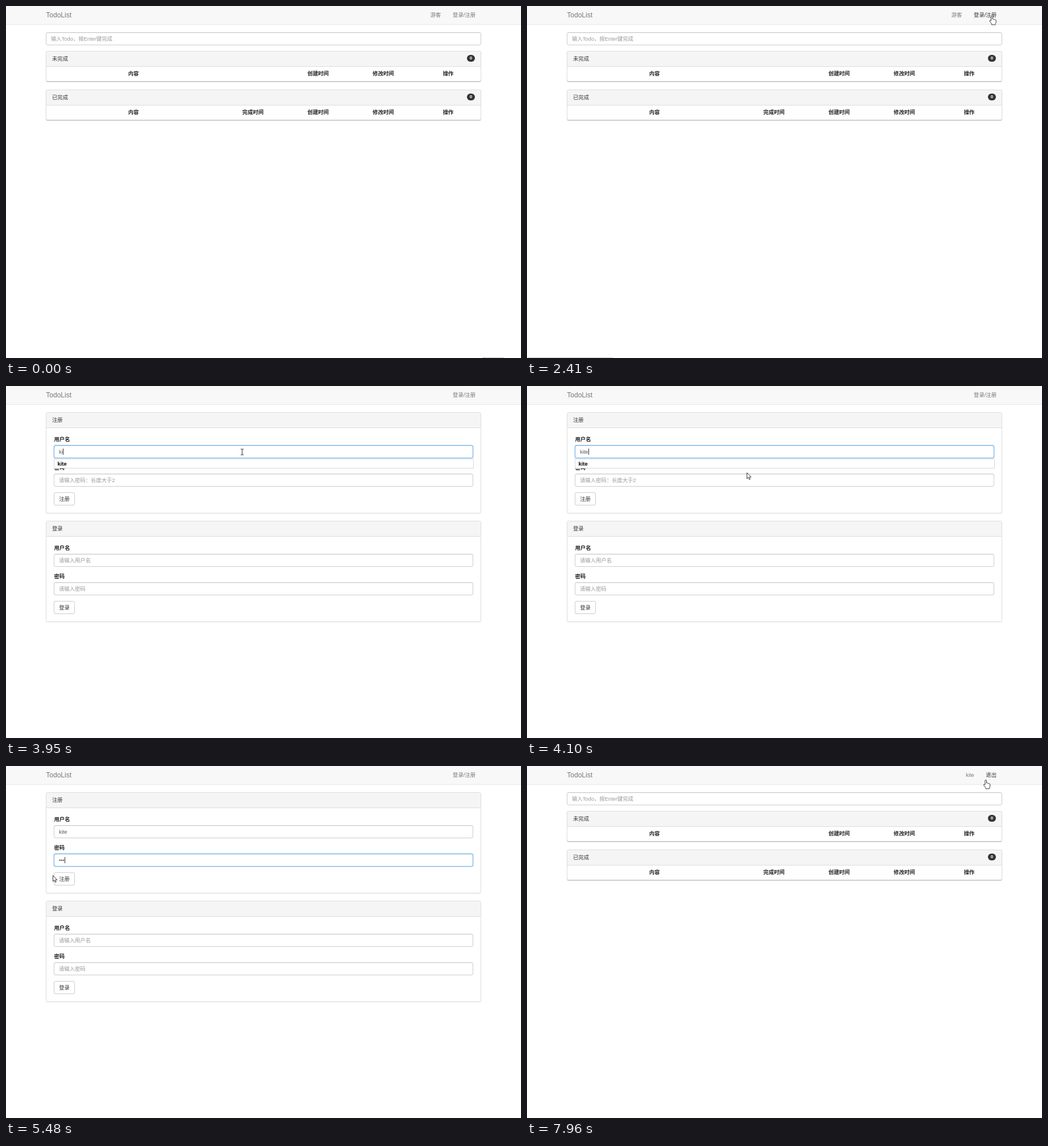
Animation of 905x619 px, one loop 8 s. Source, as an HTML page:

```html
<!DOCTYPE html>
<html lang="zh-CN">
<head>
<meta charset="utf-8">
<title>TodoList</title>
<style>
html, body { margin: 0; width: 100%; height: 100%; overflow: hidden; background: #fff; }
body { position: relative; font: 9.333px/14px "Liberation Sans", Arial, "Noto Sans CJK SC", "Noto Sans CJK", sans-serif; color: #333; }
div, svg { position: absolute; box-sizing: border-box; }
.view { inset: 0; }
.text { white-space: pre; height: 14px; }
.mid { width: 80px; text-align: center; }
.bold { font-weight: bold; color: #222; }
.nav { left: 0; top: 0; width: 100%; height: 33px; background: #f8f8f8; border-bottom: 1px solid #e7e7e7; }
.brand { font-size: 12px; color: #777; }
.link { color: #777; }
.hint { color: #999; }
.value { color: #555; }
.panel { border: 1px solid #ddd; border-radius: 3px; background: #fff; box-shadow: 0 1px 1px rgba(0,0,0,.05); }
.list { border-bottom-color: #c4c4c4; box-shadow: 0 1px 1px rgba(0,0,0,.16); }
.head { left: 0; top: 0; width: 100%; height: 27px; background: #f5f5f5; border-bottom: 1px solid #ddd; border-radius: 2px 2px 0 0; }
.input { border: 1px solid #ccc; border-radius: 3px; background: #fff; box-shadow: inset 0 1px 1px rgba(0,0,0,.075); }
.ring { border: 1px solid #66afe9; border-radius: 3px; box-shadow: 0 0 2px rgba(102,175,233,.6); }
.button { border: 1px solid #ccc; border-radius: 3px; background: #fff; }
.button.hot { background: #e6e6e6; border-color: #adadad; }
.badge { border-radius: 7px; background: #333; color: #fff; font: bold 8px/12px "Liberation Sans", Arial, sans-serif; text-align: center; }
.caret { display: inline-block; width: 1px; height: 11px; background: #333; vertical-align: -2px; }
.drop { border: 1px solid #d8d8d8; background: #fff; }
.dots { border-top: 1px dotted #888; }
.status { background: #c8c8c8; }
svg { left: 0; top: 0; overflow: visible; }
</style>
</head>
<body>
<script>
const LOOP = 8000, NAME = 'kite';

function box(parent, cls, x, y, w, h) {
  const el = document.createElement('div');
  el.className = cls;
  Object.assign(el.style, { left: x + 'px', top: y + 'px' });
  if (w) el.style.width = w + 'px';
  if (h) el.style.height = h + 'px';
  parent.append(el);
  return el;
}

// y is the vertical centre of the line
function text(parent, str, x, y, cls = '') {
  const el = box(parent, 'text ' + cls, x, y - 7);
  el.textContent = str;
  return el;
}

const centred = (parent, str, cx, y, cls) => text(parent, str, cx - 40, y, 'mid ' + cls);

function navLink(str, right) {
  const el = text(document.body, str, 0, 15.5, 'link');
  el.style.left = 'auto';
  el.style.right = 905 - right + 'px';
  return el;
}

function panel(parent, title, y, h, cls = '') {
  const el = box(parent, 'panel ' + cls, 70, y, 765, h);
  box(el, 'head', 0, 0);
  text(parent, title, 81, y + 14);
}

function list(title, y, columns) {
  panel(todo, title, y, 54, 'list');
  box(todo, 'badge', 810, y + 7, 14, 12).textContent = '0';
  for (const [str, cx] of columns) centred(todo, str, cx, y + 40, 'bold');
}

function field(label, hint, y) {
  text(form, label, 84.5, y - 10, 'bold');
  box(form, 'input', 84, y, 737, 23);
  const value = text(form, hint, 93, y + 11.5, 'hint');
  const ring = box(form, 'ring', 84, y, 737, 23);
  ring.style.opacity = 0;
  return { value, ring, hint };
}

function account(title, y, tip) {
  panel(form, title, y, 178);
  const user = field('用户名', '请输入用户名' + tip, y + 58);
  const pass = field('密码', '请输入密码' + tip, y + 108);
  const button = box(form, 'button', 84, y + 141, 37, 23);
  centred(form, title, 102.5, y + 152.5, '');
  return { user, pass, button };
}

box(document.body, 'nav', 0, 0);
text(document.body, 'TodoList', 70.3, 15.5, 'brand');
const links = {
  guest: navLink('游客', 764.3),
  login: navLink('登录/注册', 825),
  name: navLink(NAME, 785.8),
  exit: navLink('退出', 825),
};

const todo = box(document.body, 'view', 0, 0);
box(todo, 'input', 70, 46, 765, 23);
text(todo, '输入Todo，按Enter键完成', 79, 57.5, 'hint');
const shared = [['内容', 224], ['创建时间', 548.5], ['修改时间', 663], ['操作', 777]];
list('未完成', 79, shared);
list('已完成', 147, [...shared, ['完成时间', 434]]);

const form = box(document.body, 'view', 0, 0);
const signUp = account('注册', 46, '：长度大于2');
account('登录', 237, '');
const drop = box(form, 'drop', 84, 128, 738, 17);
text(drop, NAME, 5.5, 7.5, 'bold').style.color = '#000';

const dots = box(document.body, 'dots', 838, 618, 36, 1);
const status = box(document.body, 'status', 1, 618, 150, 1);

document.body.insertAdjacentHTML('beforeend', `
<svg width="1" height="1" stroke-linejoin="round">
  <path id="arrow" fill="#fff" stroke="#222" stroke-width=".9" d="M.5 .5V11L2.9 8.8L4.5 12.5L6.2 11.8L4.6 8.2H7.8Z"/>
  <path id="beam" fill="none" stroke="#222" d="M-2.5 -5H-.7L0 -4.5L.7 -5H2.5M0 -4.5V4.5M-2.5 5H-.7L0 4.5L.7 5H2.5"/>
  <path id="hand" fill="#fff" stroke="#222" stroke-width=".9" d="M-1.5 8V.6Q-1.4 -.6 -.3 -.6T1 .6V5Q2.3 4.2 3.2 5.5Q4.5 4.8 5.3 6.2Q7.3 5.8 7.3 7.7V10.5Q7 12.5 6 13.2V15H-.4V13.4L-3.7 9.2Q-4.5 7.7 -3.3 7.2Q-2.4 7 -1.5 8Z"/>
</svg>`);
const pointer = document.querySelector('svg');
const shapes = [...pointer.children];

// shape, start, end, number of hops, then the waypoints
const moves = [
  ['arrow', 400, 550, 3, 844, 606, 836, 540, 834, 504],
  ['arrow', 710, 1403, 10, 846, 508, 850, 420, 800, 150, 760, 4],
  ['beam', 1480, 1480, 1, 758, 18],
  ['beam', 1550, 1640, 2, 758, 17, 758, 12],
  ['arrow', 1790, 1867, 2, 764, 13, 771, 13],
  ['hand', 1943, 2250, 5, 778, 14, 816, 15],
  ['hand', 2410, 2410, 1, 817, 18],
  ['arrow', 2790, 3100, 5, 770, 36, 620, 72, 465, 98],
  ['beam', 3180, 3180, 1, 433, 106],
  ['beam', 3240, 3320, 2, 424, 112, 415, 116],
  ['arrow', 4025, 4100, 2, 402, 132, 386, 152],
  ['beam', 4175, 4325, 3, 382, 160, 379, 167],
  ['beam', 5180, 5260, 2, 330, 169, 270, 172],
  ['arrow', 5330, 5480, 3, 200, 186, 120, 192, 82, 192],
  ['hand', 5560, 5720, 3, 92, 199, 98, 205],
  ['hand', 5960, 5960, 1, 98, 195],
  ['arrow', 6440, 7210, 11, 100, 212, 125, 238, 400, 150, 650, 60, 757, 21],
  ['arrow', 7270, 7580, 5, 759, 21, 777, 21],
  ['arrow', 7730, 7730, 1, 781, 21],
  ['hand', 7900, 7960, 2, 797, 24, 806.5, 25],
];

function pointerAt(t) {
  const move = moves.findLast(m => m[1] <= t);
  if (!move) return null;
  const [shape, start, end, hops, ...path] = move;
  const hop = hops > 1 ? Math.min(hops - 1, Math.floor((t - start) / (end - start) * (hops - 1) + .01)) : 0;
  const last = path.length / 2 - 1;
  const u = hops > 1 ? hop / (hops - 1) * last : 0;
  const i = Math.min(Math.floor(u), Math.max(0, last - 1));
  const at = k => {
    const a = path[2 * i + k], b = path[2 * i + 2 + k] ?? a;
    return a + (b - a) * (u - i);
  };
  return { shape, x: Math.round(at(0) * 2) / 2, y: Math.round(at(1) * 2) / 2 };
}

const ramp = (t, start) => t < start ? 0 : Math.min(1, .5 + (t - start) / 180);
const show = (el, on) => { el.style.visibility = on ? 'visible' : 'hidden'; };

function setField(f, str, focused, glow) {
  const key = str + focused;
  if (f.key !== key) {
    f.key = key;
    f.value.className = 'text ' + (str ? 'value' : 'hint');
    f.value.textContent = str || f.hint;
    if (focused) {
      const caret = document.createElement('span');
      caret.className = 'caret';
      if (str) f.value.append(caret); else f.value.prepend(caret);
      if (!str) caret.style.marginRight = '-1px';
    }
  }
  f.ring.style.opacity = glow;
}

function render(t) {
  const onForm = t >= 2640 && t < 5960, signedIn = t >= 5960;
  show(form, onForm);
  show(todo, !onForm);
  show(links.guest, t < 2640);
  show(links.login, !signedIn);
  show(links.name, signedIn);
  show(links.exit, signedIn);
  show(dots, t < 2410);
  show(status, t >= 2100 && t < 2940);

  const p = pointerAt(t);
  show(pointer, p);
  if (p) {
    pointer.style.transform = `translate(${p.x}px, ${p.y}px)`;
    for (const s of shapes) s.style.display = s.id === p.shape ? '' : 'none';
  }
  const hover = (el, left, right) => {
    el.style.color = p && p.y < 33 && p.x >= left && p.x < right ? '#333' : '';
  };
  hover(links.guest, 735, 774);
  hover(links.login, 774, 835);
  hover(links.name, 760, 795);
  hover(links.exit, 795, 835);

  const typed = t < 3950 ? '' : t < 4025 ? NAME.slice(0, 2) : NAME;
  const bullets = '•'.repeat(Math.max(0, Math.min(3, Math.floor((t - 4950) / 76) + 1)));
  setField(signUp.user, typed, t >= 3470 && t < 4400, ramp(t, 3470) - ramp(t, 4400));
  setField(signUp.pass, bullets, t >= 4400 && t < 5800, ramp(t, 4400) - ramp(t, 5800));
  show(drop, onForm && t >= 3950 && t < 4400);
  signUp.button.classList.toggle('hot', t >= 5560);
}

const begin = performance.now();
function tick() {
  render((performance.now() - begin) % LOOP);
  requestAnimationFrame(tick);
}
tick();
</script>
</body>
</html>
```
